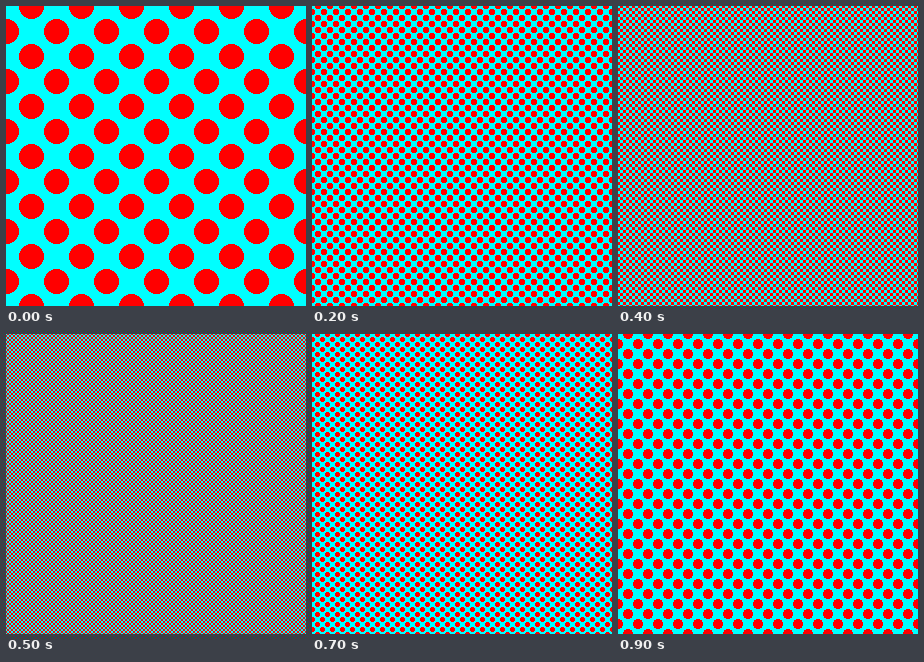
An HTML page with a canvas that plays this animation: 300x300 px, repeating every 1 s.

```html
<!DOCTYPE html>
<html lang="en">
<head>
<meta charset="utf-8">
<title>Shrinking dots</title>
<style>
html, body { margin: 0; width: 100%; height: 100%; overflow: hidden; background: #0ff; }
canvas { display: block; width: 100vw; height: 100vh; image-rendering: pixelated; }
</style>
</head>
<body>
<canvas id="stage" width="300" height="300"></canvas>
<script>
const SIZE = 300;
const STEP = 100;
const DIAMETERS = [25, 10, 6, 5, 3, 2, 3, 5, 6, 10];
const RED = [255, 0, 0, 255];
const CYAN = [0, 255, 255, 255];
const ctx = document.getElementById('stage').getContext('2d');

// Signed distance to the nearest multiple of p
const wrap = (v, p) => v - p * Math.round(v / p);

// Hard-edged dots on a checkerboard whose cells are one diameter wide
function makePattern(size) {
  const image = ctx.createImageData(SIZE, SIZE);
  const period = size * 2;
  // Odd dots are centred on a pixel, even ones on a pixel corner
  const shift = size % 2 ? 0 : 0.5;
  const inDot = (x, y) => Math.hypot(wrap(x, period), wrap(y, period)) <= size / 2;

  for (let y = 0; y < SIZE; y++) {
    for (let x = 0; x < SIZE; x++) {
      const px = x + shift, py = y + shift;
      const red = inDot(px - size, py) || inDot(px, py - size);
      image.data.set(red ? RED : CYAN, (y * SIZE + x) * 4);
    }
  }
  return image;
}

const patterns = new Map([...new Set(DIAMETERS)].map(d => [d, makePattern(d)]));
const start = performance.now();
let shown = -1;

function draw() {
  const elapsed = Math.max(0, performance.now() - start);
  const step = Math.floor(elapsed / STEP) % DIAMETERS.length;
  if (step !== shown) {
    ctx.putImageData(patterns.get(DIAMETERS[step]), 0, 0);
    shown = step;
  }
  requestAnimationFrame(draw);
}
draw();
</script>
</body>
</html>
```
